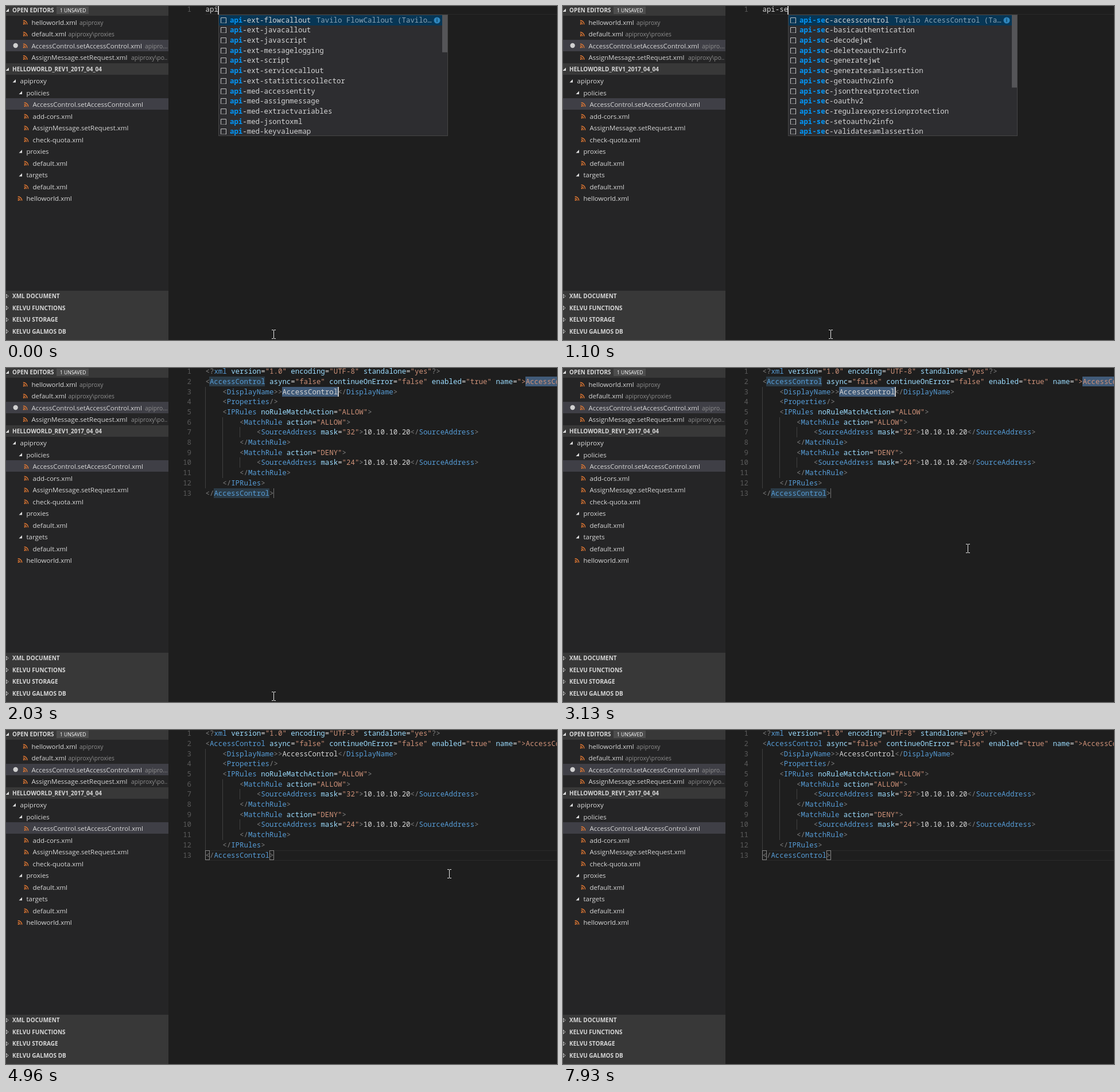
Recreate the animation shown at these times as an HTML page with a canvas. Size 960 px wide and 583 px high, loop 8 s.

```html
<!DOCTYPE html>
<html lang="en">
<head>
<meta charset="utf-8">
<title>Editor snippet demo</title>
<style>
html, body { margin: 0; overflow: hidden; background: #1e1e1e; }
canvas { display: block; }
</style>
</head>
<body>
<canvas id="stage" width="960" height="583"></canvas>
<script>
const ctx = document.getElementById('stage').getContext('2d');
const LOOP = 8000, LEFT = 347, CHAR = 7.44, LINE = 17.7, ROW = 20.5;
const UI = '"Open Sans", sans-serif';
const MONO = '12.4px "Noto Sans Mono", monospace';

function rect(x, y, w, h, color) {
  ctx.fillStyle = color;
  ctx.fillRect(x, y, w, h);
}
function text(str, x, y, font, color, align = 'left') {
  ctx.font = font;
  ctx.fillStyle = color;
  ctx.textAlign = align;
  ctx.fillText(str, x, Math.round(y));
}
function shape(points, color, outline) {
  ctx.beginPath();
  points.forEach(([x, y]) => ctx.lineTo(x, y));
  ctx.closePath();
  ctx.fillStyle = ctx.strokeStyle = color;
  ctx.lineWidth = 1;
  outline ? ctx.stroke() : ctx.fill();
}
function disc(x, y, r, color) {
  ctx.beginPath();
  ctx.arc(x, y, r, 0, 7);
  ctx.fillStyle = color;
  ctx.fill();
}

// Sidebar
const rowY = i => 8 + ROW * i;
const openTriangle = (x, y) => shape([[x + 5, y - 3], [x + 5, y + 2.5], [x - .5, y + 2.5]], '#e0e0e0');

function feedIcon(x, y) {
  disc(x - 2.5, y + 2.7, 1.2, '#e37933');
  ctx.strokeStyle = '#e37933';
  ctx.lineWidth = 1.4;
  for (const r of [4, 7]) {
    ctx.beginPath();
    ctx.arc(x - 3.6, y + 3.8, r, -Math.PI / 2, 0);
    ctx.stroke();
  }
}
function header(label, y) {
  text(label, 11, y + 3.5, `bold 10px ${UI}`, '#d8d8d8');
}

const openFiles = [
  ['helloworld.xml', 'apiproxy', 128],
  ['default.xml', 'apiproxy\\proxies', 108.5],
  ['AccessControl.setAccessControl.xml', 'apipro...', 242],
  ['AssignMessage.setRequest.xml', 'apiproxy\\po..', 218]
];
// A trailing slash marks a folder; depth sets the indent.
const tree = [
  [0, 'apiproxy/'], [1, 'policies/'], [2, 'AccessControl.setAccessControl.xml'],
  [2, 'add-cors.xml'], [2, 'AssignMessage.setRequest.xml'], [2, 'check-quota.xml'],
  [1, 'proxies/'], [2, 'default.xml'], [1, 'targets/'], [2, 'default.xml'], [1, 'helloworld.xml']
];
const panels = ['XML DOCUMENT', 'KELVU FUNCTIONS', 'KELVU STORAGE', 'KELVU GALMOS DB'];

function sidebar() {
  rect(0, 0, 283, 583, '#252526');
  rect(0, 0, 283, 17, '#383838');
  rect(0, 100, 283, 20, '#383838');
  rect(0, 497, 283, 86, '#383838');
  rect(0, 59, 283, 20, '#3f3f46');
  rect(0, 161, 283, 20, '#3f3f46');

  openTriangle(0, 7.5);
  header('OPEN EDITORS', 7.5);
  rect(88, 1, 56, 13, '#4d4d4d');
  text('1 UNSAVED', 94, 11, `8.5px ${UI}`, '#fff');
  openFiles.forEach(([name, path, x], i) => {
    const y = rowY(i + 1);
    feedIcon(33.5, y);
    text(name, 44.5, y + 4, `11.5px ${UI}`, '#d8d8d8');
    text(path, x, y + 4, `10.3px ${UI}`, '#8f8f8f');
  });
  disc(16.7, 69, 4.2, '#d0d0d0');

  openTriangle(0, rowY(5));
  header('HELLOWORLD_REV1_2017_04_04', rowY(5) - .5);
  tree.forEach(([depth, label], i) => {
    const x = 24.5 + depth * 11, y = rowY(i + 6);
    if (label.endsWith('/')) openTriangle(x - 12.5, y);
    else feedIcon(x - 11.2, y);
    text(label.replace('/', ''), x, y + 4, `11.5px ${UI}`, '#d8d8d8');
  });
  panels.forEach((label, i) => {
    const y = 506.5 + ROW * i;
    shape([[.5, y - 3.5], [4, y], [.5, y + 3.5]], '#c0c0c0', true);
    header(label, y);
  });
}

// Editor
const col = c => LEFT + c * CHAR;
const lineTop = n => Math.round(-2.8 + LINE * (n - 1));
const baseline = n => 10.2 + LINE * (n - 1);
const lineNumber = n => text(n, 323, baseline(n), MONO, '#5a5a5a', 'right');
const code = (str, c, n, color) => text(str, col(c) + .5, baseline(n), MONO, color);

const xml = `<?xml version="1.0" encoding="UTF-8" standalone="yes"?>
<AccessControl async="false" continueOnError="false" enabled="true" name=">AccessControl">
    <DisplayName>>AccessControl</DisplayName>
    <Properties/>
    <IPRules noRuleMatchAction="ALLOW">
        <MatchRule action="ALLOW">
            <SourceAddress mask="32">10.10.10.20</SourceAddress>
        </MatchRule>
        <MatchRule action="DENY">
            <SourceAddress mask="24">10.10.10.20</SourceAddress>
        </MatchRule>
    </IPRules>
</AccessControl>`.split('\n');
const token = /(<[?\/]?)(\w+)|(\w+)(=)("[^"]*"?)|([?\/]?>)|([^<>\s]+)/g;
const tokenColors = ['#808080', '#569cd6', '#9cdcfe', '#d4d4d4', '#ce9178', '#808080', '#d4d4d4'];

function xmlLine(line, n) {
  for (const match of line.matchAll(token)) {
    let c = match.index;
    match.slice(1).forEach((part, k) => {
      if (!part) return;
      code(part, c, n, tokenColors[k]);
      c += part.length;
    });
  }
}
function currentLine(n) {
  rect(LEFT, lineTop(n), 613, 1, '#2a2a2a');
  rect(LEFT, lineTop(n) + 17, 613, 1, '#2a2a2a');
}
const caret = (x, n) => rect(x, lineTop(n), 2, 17, '#c0c0c0');
const mark = (c, n, color) => rect(Math.round(col(c)), lineTop(n), 97, 17, color);

function snippet(t) {
  const editing = t < 4520;
  if (editing) {
    mark(1, 2, '#2b3b47');
    mark(2, 13, '#2b3b47');
    mark(75, 2, '#415b79');
    mark(18, 3, '#415b79');
    rect(466, 210, 1, 17, '#737373');
  } else {
    currentLine(13);
  }
  const guide = (c, from, to) =>
    rect(Math.round(col(c)), lineTop(from), 1, lineTop(to + 1) - lineTop(from), '#404040');
  guide(0, 3, 12);
  guide(4, 6, 11);
  guide(8, 7, 7);
  guide(8, 10, 10);
  xml.forEach((line, i) => {
    lineNumber(i + 1);
    xmlLine(line, i + 1);
  });
  if (!editing) {
    ctx.strokeStyle = '#888';
    ctx.lineWidth = 1;
    for (const x of [347.5, 459.5]) ctx.strokeRect(x, 210.5, 7, 16);
  }
  const flips = [2450, 2950, 3390, 3940, 4370, 4520, 4960, 5420, 5980, 6400, 6950, 7390, 7930];
  if (flips.filter(f => t >= f).length % 2 === 0) editing ? caret(578, 3) : caret(466, 13);
}

// Completion list
const prefixed = (prefix, names) => names.split(' ').map(name => prefix + name);
const secured = prefixed('api-sec-', 'accesscontrol basicauthentication decodejwt deleteoauthv2info generatejwt ' +
  'generatesamlassertion getoauthv2info jsonthreatprotection oauthv2 regularexpressionprotection setoauthv2info validatesamlassertion');
const all = [
  ...prefixed('api-ext-', 'flowcallout javacallout javascript messagelogging script servicecallout statisticscollector'),
  ...prefixed('api-med-', 'accessentity assignmessage extractvariables jsontoxml keyvaluemap messagevalidation raisefault xmltojson xsltransform'),
  ...secured
];

function popup(x, items, total, first, selected, matched, title) {
  rect(x, 15, 400, 212, '#454545');
  rect(x + 1, 16, 398, 210, '#2d2d30');
  items.slice(first, first + 12).forEach((item, i) => {
    const y = Math.round(24.6 + LINE * i), labelX = x + 20;
    const isSelected = first + i === selected;
    if (isSelected) rect(x + 1, y - 9, 398, Math.min(18, 235 - y), '#073655');

    ctx.strokeStyle = '#c5c5c5';
    ctx.lineWidth = 1;
    ctx.beginPath();
    ctx.moveTo(x + 4.5, y + 5);
    ctx.lineTo(x + 4.5, y - 4.5);
    ctx.lineTo(x + 13.5, y - 4.5);
    ctx.lineTo(x + 13.5, y + 5);
    ctx.stroke();
    for (let k = 0; k < 5; k++) rect(x + 4 + 2 * k, y + 4, 1, 1, '#c5c5c5');

    text(item.slice(0, matched), labelX, y + 4, 'bold ' + MONO, '#0097fb');
    text(item.slice(matched), labelX + matched * CHAR, y + 4, MONO, '#d4d4d4');
    if (isSelected) {
      const start = labelX + item.length * CHAR + 9.5;
      const fit = Math.floor((x + 375 - start) / CHAR);
      text(`Tavilo ${title} (Tavilo`.slice(0, fit - 1) + '…', start, y + 4, MONO, '#8ba3b4');
      disc(x + 381, y, 5.5, '#2f86bd');
      text('i', x + 381, y + 3, `bold 8px ${UI}`, '#073655', 'center');
    }
  });
  const view = 212 / LINE;
  rect(x + 390, 16 + 211 * first / total, 9, 211 * view / total, '#555558');
}

function typing(t) {
  const typed = t < 430 ? 'api' : t < 830 ? 'api-' : t < 1100 ? 'api-s' : t < 1390 ? 'api-se' : 'api-sec';
  const x = Math.round(col(typed.length) + .5);
  currentLine(1);
  lineNumber(1);
  code(typed, 0, 1, '#d4d4d4');
  if (t < 1780) rect(x - 1, 0, 2, 15, '#c0c0c0');
  if (t < 830) popup(x, all, 39, 0, 0, typed.length, 'FlowCallout');
  else if (t < 980) popup(x, all, 39, 5, 16, 4, 'AccessControl');
  else popup(x, secured, 20, 0, 0, typed.length, 'AccessControl');
}

// Pointer: [time, x, y], each held until the next
const pointerPath = [
  [0, 466, 573], [2730, 500, 540], [2870, 590, 440], [3110, 705, 315], [3390, 770, 251],
  [3670, 772, 249], [4810, 772, 251], [6540, 800, 190], [6680, 835, 124],
  [7540, 878, 90], [7680, 909, 64], [7930, -50, -50]
];
function pointer(t) {
  const [, x, y] = pointerPath.findLast(([start]) => t >= start);
  rect(x, y - 7, 1, 14, '#e8e8e8');
  for (const end of [-8, 7]) {
    rect(x - 3, y + end, 3, 1, '#e8e8e8');
    rect(x + 1, y + end, 3, 1, '#e8e8e8');
  }
}

function draw(now) {
  const t = now % LOOP;
  rect(0, 0, 960, 583, '#1e1e1e');
  sidebar();
  t < 2030 ? typing(t) : snippet(t);
  pointer(t);
}
const origin = performance.now();
function tick() {
  draw(performance.now() - origin);
  requestAnimationFrame(tick);
}
tick();
</script>
</body>
</html>
```
